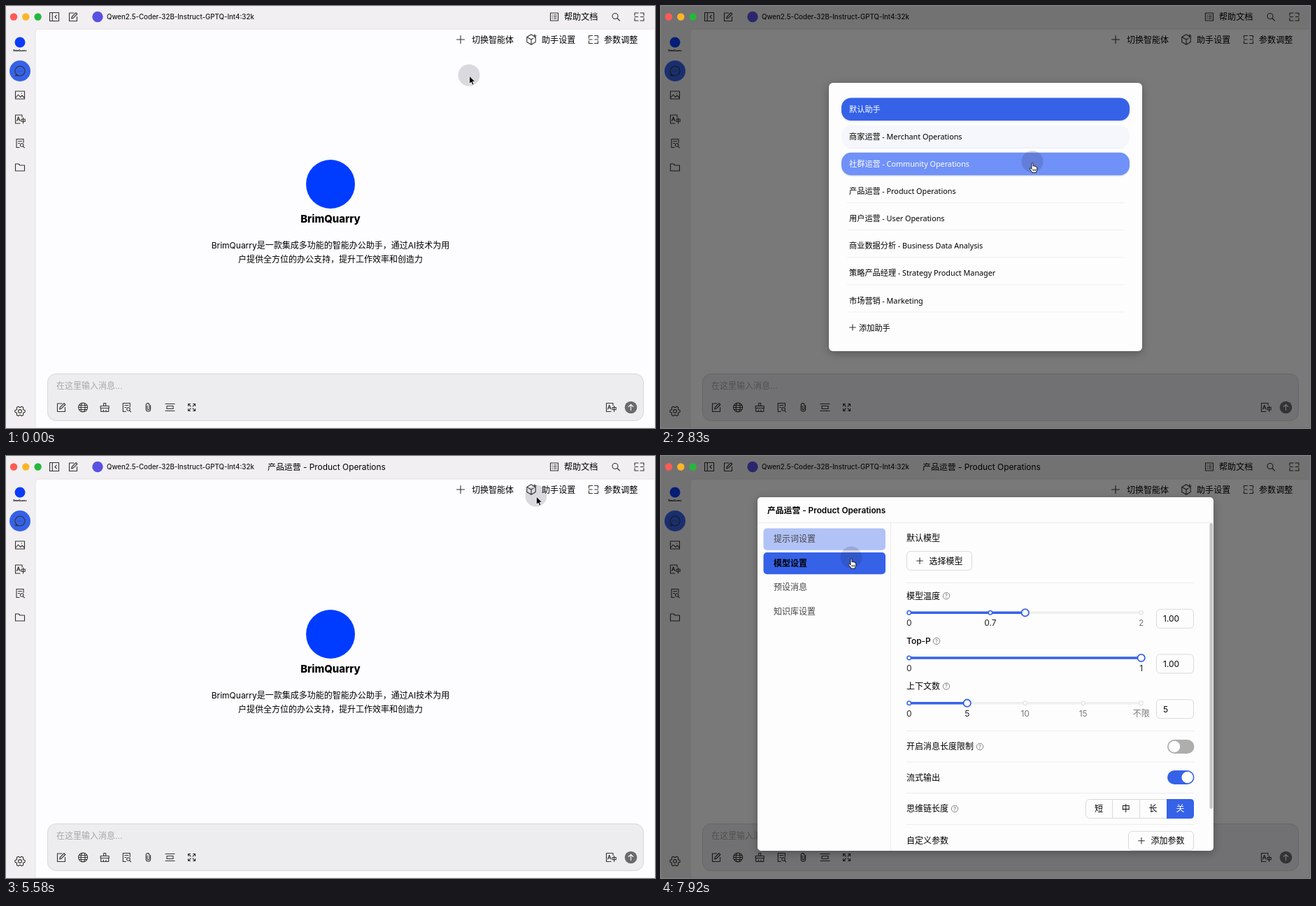
Animation, 928 px wide and 604 px high, one loop 8 s. Source, as an HTML page:

```html
<!DOCTYPE html>
<html lang="zh">
<head>
<meta charset="utf-8">
<title>Assistant switcher</title>
<style>
html, body { margin: 0; width: 100%; height: 100%; overflow: hidden; background: #f1eff1; }
svg { display: block; width: 100%; height: 100%; }
text { font-family: Inter, "Noto Sans CJK SC", "Noto Sans CJK", sans-serif; white-space: pre; }
.ubu { font-family: "Noto Sans", "Noto Sans CJK SC", "Noto Sans CJK", sans-serif; }
.ico { fill: none; stroke: #33332f; stroke-width: 1.1; stroke-linecap: round; stroke-linejoin: round; }
.card { fill: #fdfdfe; filter: drop-shadow(0 3px 6px rgba(0,0,0,.28)); }
.hl { filter: drop-shadow(0 1px 1px rgba(0,0,0,.15)); }
</style>
</head>
<body>
<svg id="stage" viewBox="0 0 928 604"></svg>
<script>
const BLUE = '#3662e8', HOVER = '#6a8df8', EDGE = '#d9d9d9', RULE = '#ececef';
const BRAND = 'BrimQuarry', AGENT = '产品运营 - Product Operations';
const FPS = 12, LOOP = 8000;

// markup helpers
const each = (list, f) => list.map(f).join('');
const text = (x, y, s, size = 12, attrs = '') =>
  `<text x="${x}" y="${y}" font-size="${size}" ${attrs}>${s}</text>`;
const mid = (x, y, s, size = 12, attrs = '') => text(x, y, s, size, `text-anchor="middle" ${attrs}`);
const bold = (x, y, s) => text(x, y, s, 12, 'font-weight="500"');
const rect = (x, y, w, h, r, attrs) =>
  `<rect x="${x}" y="${y}" width="${w}" height="${h}" rx="${r}" ${attrs}/>`;
const dot = (x, y, r, attrs) => `<circle cx="${x}" cy="${y}" r="${r}" ${attrs}/>`;
const line = (x1, y1, x2, y2, c) => `<path d="M${x1} ${y1}L${x2} ${y2}" stroke="${c}" fill="none"/>`;
const box = (x, y, w, h) => rect(x + .5, y + .5, w - 1, h - 1, 5, `fill="#fdfdfe" stroke="${EDGE}"`);

// path helpers, all relative to an icon's own centre
const frame = (w, h, x = 0, y = 0) => `M${x - w / 2} ${y - h / 2}h${w}v${h}h${-w}Z`;
const ring = (x, y, rx, ry = rx) =>
  `M${x - rx} ${y}a${rx} ${ry} 0 1 1 ${2 * rx} 0a${rx} ${ry} 0 1 1 ${-2 * rx} 0`;
const cross = r => `M${-r} 0H${r}M0 ${-r}V${r}`;
const mirror = f => [[-1, -1], [1, -1], [-1, 1], [1, 1]].map(([a, b]) => f(a, b)).join('');
const corners = (w, h, a, b) => mirror((i, j) => `M${i * w} ${j * (h - b)}V${j * h}H${i * (w - a)}`);
const polygon = (n, radius) => 'M' + Array.from({ length: n }, (_, i) => {
  const a = 2 * Math.PI * i / n, r = radius(i);
  return `${r * Math.sin(a)} ${-r * Math.cos(a)}`;
}).join('L') + 'Z';

const ICONS = {
  panel: frame(13, 12) + 'M-2.7-6V6M3.3-2.3L1 0 3.3 2.3',
  edit: 'M1-5.5H-5.5V6H5.5V0M-2.3 2.5L-1.7 0 4-5.8 5.8-4 0 1.8Z',
  list: frame(11, 11) + each([-2.5, 0, 2.5], y => `M-3 ${y}h.5M-.5 ${y}h3.5`),
  search: ring(-1, -1, 4) + 'M2 2L5.5 5.5',
  scan: corners(6.5, 5.5, 5, 3.5) + 'M-6.5 0H-2M2 0H6.5',
  plus: cross(5.5),
  add: cross(4.3),
  cube: polygon(6, () => 7.2) + 'M-6-3.5L0 0 3-1.8M0 0V7M5-7.5V-3M2.8-5.2H7.2',
  chat: ring(0, 0, 7) + 'M-5 5L-6.8 6.8H0' + each([-3, 0, 3], x => `M${x} 0h.1`),
  image: frame(13, 11) + 'M-6.5 4L-2.5-.5 .5 3 3 .5 6.5 4M2.3-2.4h.2',
  lang: 'M0 6H-6.5V-6H3V-3M-4.5 2.5L-2.3-3.2 0 2.5M-3.8 .8H-.8M4.6-2V6' + frame(5.2, 3.2, 4.6, 1.6),
  docs: 'M-1 6H-5V-6H5V-1M-2.5-3h5M-2.5 0h2M4.3 4.3l2 2' + ring(2.7, 2.5, 2.3),
  folder: 'M-6.5-5H-2L0-3H6.5V5H-6.5Z',
  globe: ring(0, 0, 6.5) + ring(0, 0, 3, 6.5) + 'M-6.5 0H6.5M-5.5-3H5.5M-5.5 3H5.5',
  brush: 'M-1.5-2V-6H1.5V-2M-1.8 6V3.5M1.8 6V3.5' + frame(12, 3, 0, -.5) + frame(11, 5, 0, 3.5),
  clip: 'M3.2-3V2.5a3.2 3.2 0 0 1-6.4 0V-3.5a2.4 2.4 0 0 1 4.8 0V2a1.5 1.5 0 0 1-3 0V-2.5',
  bars: 'M-6.5-5H6.5M-6.5 5H6.5' + frame(9, 4),
  expand: corners(5, 5, 3, 3) + mirror((i, j) => `M${i * 5} ${j * 5}L${i * 1.5} ${j * 1.5}`),
  gear: polygon(18, i => i % 3 ? 7.2 : 5.2) + ring(0, 0, 2.4),
  send: 'M0 4V-4M-3.2-1L0-4.2 3.2-1'
};
const icon = (name, x, y, attrs = '') =>
  `<path class="ico" transform="translate(${x} ${y})" d="${ICONS[name]}" ${attrs}/>`;
const iconText = (name, x, y, gap, s, size) => icon(name, x, y) + text(x + gap, y + 4.6, s, size);

const app = () =>
  `<path d="M42 604V39Q42 33 48 33H928V604Z" fill="#fdfdff" stroke="#e6e3e1"/>` +
  icon('panel', 69, 15.5) + icon('edit', 96, 15.5) +
  dot(131, 15.5, 7.7, 'fill="#5a50e2"') +
  text(144, 19, 'Qwen2.5-Coder-32B-Instruct-GPTQ-Int4:32k', 9.7, 'font-weight="500" fill="#1c1c1c"') +
  text(374, 20, AGENT, 11.9, 'id="agent"') +
  iconText('list', 784, 15.5, 14, '帮助文档', 12.1) + icon('search', 872, 15.5) + icon('scan', 905.5, 15.5) +
  iconText('plus', 650, 48, 16, '切换智能体') + iconText('cube', 751, 48, 15, '助手设置', 12.1) +
  iconText('scan', 840, 48, 15, '参数调整', 12.1) +
  dot(20, 52, 7.5, 'fill="#0a3cf5"') + mid(20, 64.5, BRAND, 3.3, 'font-weight="800"') +
  dot(20, 93, 15, `fill="${BLUE}"`) +
  each(['chat', 'image', 'lang', 'docs', 'folder'], (n, i) => icon(n, 20, 93 + 34.5 * i)) +
  icon('gear', 20, 580) +
  dot(464, 255, 35, 'fill="#003cff"') +
  mid(464, 309.5, BRAND, 14.8, 'font-weight="800"') +
  mid(464, 347, BRAND + '是一款集成多功能的智能办公助手，通过AI技术为用') +
  mid(464, 366.5, '户提供全方位的办公支持，提升工作效率和创造力') +
  rect(59.5, 526.5, 852, 67, 12, 'fill="#edecef" stroke="#d8d7d6"') +
  text(72, 548.3, '在这里输入消息...', 12, 'fill="#a6a6a6"') +
  rect(72.3, 536, 1.2, 15, 0, 'id="caret" fill="#222"') +
  each(['edit', 'globe', 'brush', 'docs', 'clip', 'bars', 'expand'], (n, i) => icon(n, 79 + 31.1 * i, 574.5)) +
  icon('lang', 865, 574.5) + dot(893.5, 574.5, 8.8, 'fill="#6b6b6b"') +
  icon('send', 893.5, 574.5, 'style="stroke:#fff"');

const ROWS = ['默认助手', '商家运营 - Merchant Operations', '社群运营 - Community Operations',
  '产品运营 - Product Operations', '用户运营 - User Operations', '商业数据分析 - Business Data Analysis',
  '策略产品经理 - Strategy Product Manager', '市场营销 - Marketing'];

const picker = () => rect(240, 110, 448, 384, 6, 'class="card"') +
  each(ROWS, (row, i) => {
    const y = 131.5 + 39.15 * i, [cn, en] = row.split(' - ');
    return (i ? line(266, y + 32.5, 662, y + 32.5, '#f0f0f2') : '') +
      rect(258, y, 412, 32.5, 14, `class="hl" fill="${i ? HOVER : BLUE}"`) +
      `<g class="lab">${text(269, y + 20, cn, 11.2)}` +
      (en ? text(271.5 + 11.2 * cn.length, y + 20, '- ' + en, 10.8, 'class="ubu"') : '') + '</g>';
  }) + iconText('add', 274, 460, 9, '添加助手', 11.2);

const PROMPT = ['你现在是一名经验丰富的产品运营专家，你擅长分析市场和用户需求，并',
  '对产品生命周期各阶段的运营策略有深刻的理解。你有出色的团队协作能',
  '力和沟通技巧，能在不同部门间进行有效的协调。请在这个角色下为我解', '答以下问题。'];
const promptPane = () => bold(351, 122.3, '名称') + box(351, 135, 27, 27) + box(385, 135, 377, 27) +
  text(395, 153.2, AGENT, 11.9) + bold(351, 184, '提示词') +
  rect(350.5, 196.5, 411.5, 312, 5, 'id="area" fill="#fdfdfe"') +
  each(PROMPT, (s, i) => text(361, 214.5 + 19 * i, s, 12.08)) +
  each([6, 3], d => line(760.5 - d, 507, 760.5, 507 - d, '#666')) +
  rect(707, 518, 55, 27, 5, `fill="${BLUE}"`) + mid(734.7, 536, '关 闭', 12.3, 'fill="#fff"');

// label followed by a round question mark
function asked(y, s) {
  const x = 360 + s.length * (s > '~' ? 12 : 6.8);
  return bold(351, y + 4.3, s) + dot(x, y, 4.7, 'fill="none" stroke="#777" stroke-width=".9"') +
    mid(x, y + 2.8, '?', 7.5, 'fill="#666"');
}
// marks: [position 0..1, label]
function slider(y, at, marks, value) {
  const px = k => 354.7 + 332 * k, ink = k => k <= at;
  return rect(px(0), y - 1.8, 332, 3.6, 2, 'fill="#efeff0"') +
    rect(px(0), y - 1.8, 332 * at, 3.6, 2, `fill="${BLUE}"`) +
    each(marks, ([k, s]) =>
      dot(px(k), y, 2.7, `fill="#fff" stroke-width="1.5" stroke="${ink(k) ? BLUE : '#e6e6e8'}"`) +
      mid(px(k), y + 19, s, 12, `fill="${ink(k) ? '#222' : '#777'}"`)) +
    dot(px(at), y, 5.2, `fill="#fff" stroke="${BLUE}" stroke-width="1.8"`) +
    box(708, y - 5.5, 54, 28) + text(718, y + 12.8, value);
}
const toggle = (y, on) => rect(724, y - 10, 38.5, 20, 10, `fill="${on ? BLUE : '#aeaeac'}"`) +
  dot(on ? 752.7 : 734, y, 8.2, 'fill="#fff"');
const button = (x, y, s) => box(x, y - 14, 94, 28) + iconText('add', x + 19, y, 13.5, s);

const SLIDERS = [
  ['模型温度', .5, [[0, 0], [.35, 0.7], [1, 2]], '1.00'],
  ['Top-P', 1, [[0, 0], [1, 1]], '1.00'],
  ['上下文数', .25, [0, 5, 10, 15, '不限'].map((s, i) => [i / 4, s]), '5']
];
const modelPane = () => bold(351, 122.3, '默认模型') + button(351, 150, '选择模型') +
  line(351, 181.5, 762, 181.5, RULE) +
  each(SLIDERS, ([name, ...rest], i) => asked(200.2 + 64.7 * i, name) + slider(224.3 + 64.7 * i, ...rest)) +
  each([0, 1, 2, 3], i => line(351, 393.5 + 44.6 * i, 762, 393.5 + 44.6 * i, RULE)) +
  asked(416, '开启消息长度限制') + toggle(416, false) +
  bold(351, 464.5, '流式输出') + toggle(460, true) +
  asked(505, '思维链长度') + box(607, 491, 155, 28) +
  each([645.5, 684.5], x => line(x, 491, x, 519, EDGE)) +
  `<path d="M723 491h34q5 0 5 5v18q0 5-5 5h-34Z" fill="${BLUE}"/>` +
  each([...'短中长关'], (s, i) => mid(626 + 38.8 * i, 509.3, s, 12, s === '关' ? 'fill="#fff"' : '')) +
  bold(351, 554.7, '自定义参数') + button(668, 550.7, '添加参数') +
  rect(784.5, 96, 4.5, 409, 2.2, 'fill="#c6c6c8"');

const settings = () => rect(138, 59, 652, 506, 5, 'class="card"') +
  text(152, 82, AGENT, 11.8, 'font-weight="600"') +
  line(138, 95.5, 790, 95.5, RULE) + line(328.5, 96, 328.5, 565, RULE) +
  each(['提示词设置', '模型设置', '预设消息', '知识库设置'], (s, i) =>
    rect(146.5, 103.5 + 34.5 * i, 174.5, 31.3, 5, `class="tab" fill="${BLUE}"`) +
    text(161, 123.4 + 34.5 * i, s, 12, 'class="tabText"')) +
  `<g id="prompt">${promptPane()}</g><g id="model" clip-path="url(#cut)">${modelPane()}</g>`;

// each pointer: offset from the halo, then its shape
const POINTERS = {
  arrow: [.5, 1, '<path d="M0 0V11.6L2.7 9.1 4.6 13.2 6.6 12.3 4.8 8.3H8.4Z" fill="#000" stroke="#fff" stroke-width=".9"/>'],
  hand: [0, 2, '<path d="M-1 6.5V1a1 1 0 0 1 2 0V4.6q1-1 2 .3 1-.7 1.8.6 1.8-.5 1.8 1.5V9.7q0 1.3-1 2.7V14H-.4V13L-3.9 8.7q.2-1.8 1.7-.9L-1 9ZM1 9v2.5m1.8-2.5v2.5m1.8-2.5v2.5" fill="#fff" stroke="#111" stroke-width=".9"/>'],
  beam: [-12, 7, '<path d="M-3-6.5Q0-6.5 0-4.8 0-6.5 3-6.5M0-4.8V4.8M-3 6.5Q0 6.5 0 4.8 0 6.5 3 6.5M-1.5 1.5h3" fill="none" stroke="#222" stroke-width="1.1"/>']
};

const stage = document.getElementById('stage');
stage.innerHTML = `<clipPath id="cut">${rect(138, 59, 652, 506, 5, '')}</clipPath>
  ${rect(0, 0, 928, 604, 0, 'fill="#f1eff1"')}${app()}${rect(0, 0, 928, 604, 0, 'id="dim"')}
  ${each(['#fe5b53', '#fdb526', '#24b83c'], (c, i) => dot(11 + 17.3 * i, 15.5, 5.2, `fill="${c}"`))}
  <g id="picker">${picker()}</g><g id="settings">${settings()}</g>
  <circle id="halo" r="15.5" fill="#1c1c38" opacity=".16"/>
  <g id="pointer">${each(Object.keys(POINTERS), k => `<g id="${k}">${POINTERS[k][2]}</g>`)}</g>`;

const $ = id => document.getElementById(id);
const all = sel => [...stage.querySelectorAll(sel)];
const set = (el, name, value) => el.setAttribute(name, value);
const show = (el, v) => set(el, 'opacity', +v);
const hl = all('.hl'), labels = all('.lab'), tabs = all('.tab'), tabTexts = all('.tabText');

const ramp = (t, from, length) => Math.min(1, Math.max(0, (t - from) / length));
const smooth = k => k * k * (3 - 2 * k);
const pulse = (t, a, b, fade = 150) => ramp(t, a, fade) * (1 - ramp(t, b, fade));

// clicks and the pointer's moves: start, end, x, y
const OPEN = 1250, PICK = 3500, EDIT = 6083, TAB = 7910;
const MOVES = [[417, 1167, 688, 51], [1750, 2417, 560, 186], [2500, 2833, 531, 222.5],
  [2833, 3417, 524, 257], [4000, 4800, 678.5, 108.5], [4833, 4917, 704.5, 93.5], [5000, 5833, 772.5, 47],
  [6583, 6667, 664.5, 157.5], [6750, 6917, 605, 220], [7000, 7400, 470, 208], [7400, 7750, 272, 145]];
const ENTER = [2300, 2690, 3120, 3700];

const pointerAt = t => MOVES.reduce(([x, y], [a, b, nx, ny]) => {
  const k = smooth(ramp(t, a, b - a));
  return [x + (nx - x) * k, y + (ny - y) * k];
}, [662, 99]);

function pointerShape(x, y, picking, editing) {
  if (picking) return y > 130 ? 'hand' : 'arrow';
  if (!editing) return 'arrow';
  if (x > 351) return y > 196 ? 'beam' : y < 59 ? 'hand' : 'arrow';
  return x < 321 ? 'hand' : 'arrow';
}

function draw(t) {
  const closed = ramp(t, PICK, 167);
  const k1 = ramp(t, OPEN, 250), k2 = ramp(t, EDIT, 250);
  const appear = k => Math.max(0, 2 * k - 1);
  const pick = appear(k1) * (1 - closed), edit = appear(k2);
  show($('dim'), .52 * (k1 ** 2.2 * (1 - closed) + k2 ** 2.2));
  show($('picker'), pick);
  show($('settings'), edit);
  set($('picker'), 'transform', `translate(0 ${.5 * (1 - ramp(t, OPEN + 250, 80))})`);

  show($('agent'), closed > 0);
  const beat = Math.floor(t / 500) % 2;
  show($('caret'), t < OPEN ? beat : t >= 4000 && t < EDIT && !beat);

  hl.forEach((el, i) => {
    const a = i ? i < ENTER.length ? pulse(t, ENTER[i - 1], ENTER[i]) : 0 : 1;
    show(el, a);
    set(labels[i], 'fill', a > .4 ? '#fff' : '#000');
  });

  const current = +(t >= TAB);
  show($('prompt'), !current);
  show($('model'), current);
  tabs.forEach((el, i) => {
    show(el, i === current ? 1 : i < current ? .38 : 0);
    set(tabTexts[i], 'font-weight', i === current ? 600 : 400);
    set(tabTexts[i], 'fill', i === current ? '#000' : '#444');
  });
  set($('area'), 'stroke', `color-mix(in srgb, #5286f2 ${100 * pulse(t, 6740, 7480)}%, ${EDGE})`);
  $('area').style.stroke = $('area').getAttribute('stroke');

  const [x, y] = pointerAt(t), shape = pointerShape(x, y, pick, edit), [dx, dy] = POINTERS[shape];
  set($('halo'), 'cx', x);
  set($('halo'), 'cy', y);
  set($('pointer'), 'transform', `translate(${x + dx} ${y + dy})`);
  for (const k in POINTERS) show($(k), k === shape);
}

const start = performance.now();
function tick() {
  const t = (performance.now() - start) % LOOP;
  draw(Math.floor((t + 4) * FPS / 1000) * 1000 / FPS);
  requestAnimationFrame(tick);
}
tick();
</script>
</body>
</html>
```
